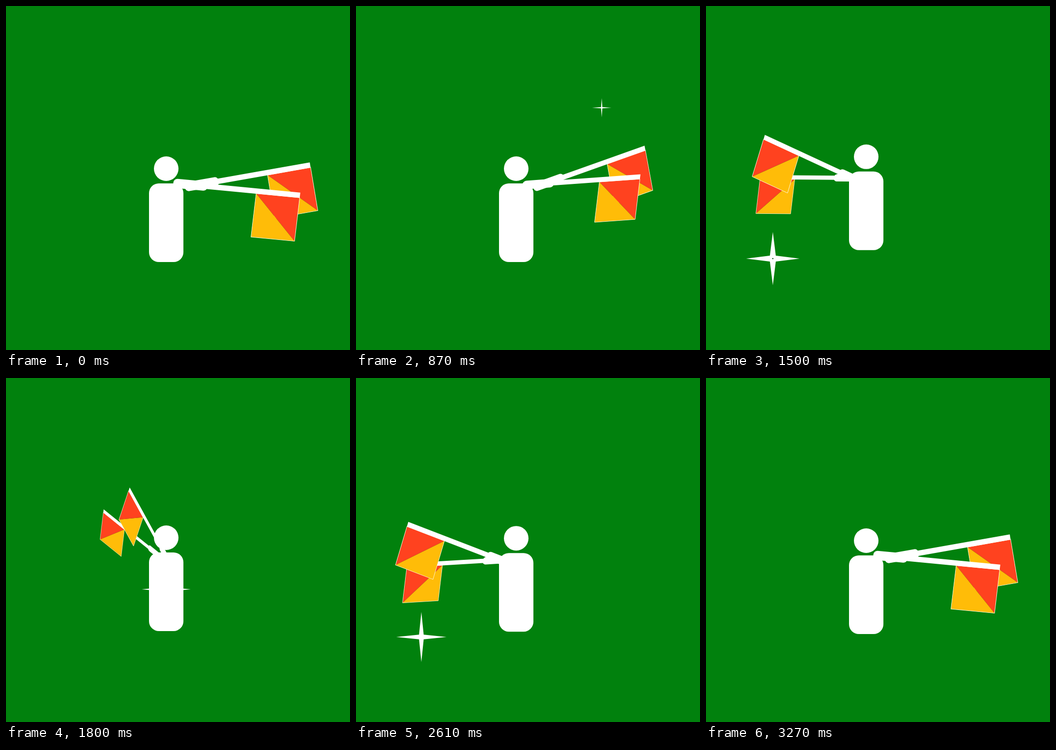
Recreate the animation shown at these times as an HTML page with a canvas. Size 700x700 px, loop 3.33 s.

```html
<!DOCTYPE html>
<html>
<head>
<meta charset="utf-8">
<title>Flag signaller</title>
<style>
html, body { margin: 0; height: 100%; overflow: hidden; background: #01810d; }
canvas { display: block; width: 100vw; height: 100vh; }
</style>
</head>
<body>
<canvas id="stage" width="700" height="700"></canvas>
<script>
const ctx = document.getElementById('stage').getContext('2d');
const STEP = 30, LOOP = 3330, LAST = 109;
const SWINGS = 3, HOPS = 4;

// One sparkle after another, each at its own place
const stars = [[178, 170], [140, 148], [97, 545], [500, 207], [476, 404], [136, 514],
  [326, 430], [91, 219], [260, 450], [133, 527], [600, 534], [149, 519]];

const clamp = p => Math.max(0, Math.min(1, p));
const sine = p => (1 - Math.cos(Math.PI * p)) / 2;
const cubic = p => p < .5 ? 4 * p ** 3 : 1 - 4 * (1 - p) ** 3;

// Degrees from upright: 80 is right, -73 is left; the way back is faster
function swingAt(step) {
  const p = step % (LAST / SWINGS);
  return 80 - 153 * (sine(clamp(p / 16)) - cubic(clamp((p - 17) / 16)));
}

// Each hop is a little higher than the one before
function hopAt(step) {
  const t = step / LAST * HOPS, hop = Math.floor(t);
  const p = clamp((t - hop - .14) / .83);
  return (90 + 11 * hop) * sine(2 * p);
}

// The flags hang down while the poles turn past upright
function armPoses(d) {
  const side = Math.tanh(d / 20);
  const size = .6 + .0022 * Math.abs(d) + .000035 * d * d;
  const rear = { angle: d - 90, drop: 3 - 20.5 * side + .1 * d, size,
    x: 18 + .36 * d, y: 15 - 9 * side };
  const front = { angle: d - 94.5 + 20 * side, drop: 6.8, size: size * (.945 + .055 * side),
    x: 1 + .28 * d, y: 13 - .002 * Math.max(0, d) ** 2 };
  return d < 0 ? [front, rear] : [rear, front];
}

function shape(points, fill) {
  ctx.beginPath();
  points.forEach(([x, y]) => ctx.lineTo(x, y));
  ctx.closePath();
  ctx.fillStyle = fill;
  ctx.fill();
}

function bar(x, y, w, h, r) {
  ctx.beginPath();
  ctx.roundRect(x, y, w, h, r);
  ctx.fillStyle = '#fff';
  ctx.fill();
}

function drawArm({ angle, drop, size, x, y }, top) {
  const a = angle * Math.PI / 180, b = drop * Math.PI / 180;
  ctx.save();
  ctx.translate(326 + x, top + y);
  ctx.transform(size * Math.cos(a), size * Math.sin(a),
    -size * Math.sin(b), size * Math.cos(b), 0, 0);
  shape([[161, 5], [161, 94], [250, 94]], '#ffbc08');
  shape([[161, 5], [250, 5], [250, 94]], '#ff421f');
  ctx.lineWidth = 1;
  ctx.strokeStyle = '#fff6d8';
  ctx.strokeRect(161, 5, 89, 89);
  bar(50, -5.5, 200, 11, 0);
  bar(-9, -9.5, 70, 19, 8);
  ctx.restore();
}

function drawBody(top) {
  bar(301, top - 55, 50, 50, 25);
  bar(291, top, 70, 160, 20);
}

function drawStar(step) {
  const t = step / LAST * stars.length, i = Math.floor(t) % stars.length;
  const up = clamp(t % 1 / .4), down = clamp((t % 1 - .4) / .6);
  const r = 59 * up ** 1.5 * (1 - .45 * down);
  const w = 8 * up ** 2.5 * (1 - down) ** 1.5;
  ctx.save();
  ctx.translate(...stars[i]);
  shape([[0, -r], [w, -w], [r, 0], [w, w], [0, r], [-w, w], [-r, 0], [-w, -w]], '#fff');
  if (w > 5) {
    ctx.beginPath();
    ctx.arc(0, 0, 1.2, 0, 7);
    ctx.fillStyle = '#01500a';
    ctx.fill();
  }
  ctx.restore();
}

function draw(now) {
  const step = Math.min(LAST, Math.floor(now % LOOP / STEP));
  const top = 361 - hopAt(step);
  ctx.fillStyle = '#01810d';
  ctx.fillRect(0, 0, 700, 700);
  drawStar(step);
  drawBody(top);
  armPoses(swingAt(step)).forEach(pose => drawArm(pose, top));
}

const start = performance.now();
function tick() {
  draw(performance.now() - start);
  requestAnimationFrame(tick);
}
tick();
</script>
</body>
</html>
```
